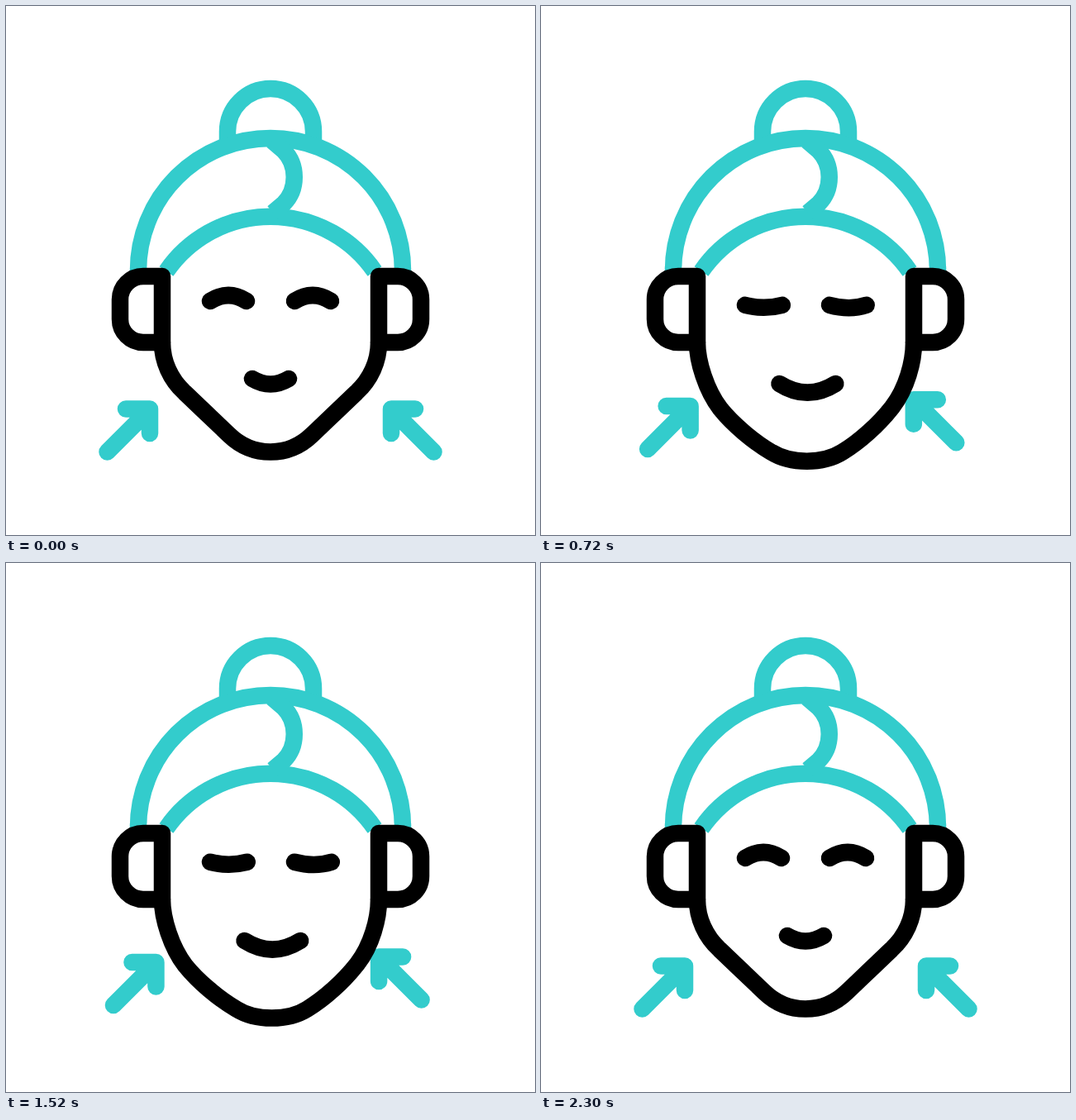
Recreate the animation shown at these times as an HTML page. Size 640 by 640 pixels, loop 2400 ms.

```html
<!DOCTYPE html>
<html lang="en">
<head>
<meta charset="utf-8">
<title>Face massage</title>
<style>
  html, body { margin: 0; width: 100%; height: 100%; overflow: hidden; background: #fff; }
  svg { display: block; width: 100vw; height: 100vh; }
  path { fill: none; stroke: #000; stroke-width: 20.5; stroke-linecap: round; stroke-linejoin: round; }
  .teal path { stroke: #3cc; }
  .hair path { stroke-linecap: butt; }
</style>
</head>
<body>
<svg viewBox="0 0 640 640">
  <g class="teal hair">
    <path d="M268 162V152A52 52 0 0 1 372 152V162"/>
    <path d="M160 322V320A160 160 0 0 1 480 320V322"/>
    <path d="M194 321A153 153 0 0 1 446 321"/>
    <path d="M322 163L336 175C353 192 353 222 336 239L323 250"/>
  </g>
  <g class="teal">
    <path id="left" d="M122.5 539.5L174 488M145 487.5H174V517"/>
    <path id="right" d="M517.5 539.5L466 488M495 487.5H466V517"/>
  </g>
  <path d="M189 407V327H166A28 28 0 0 0 138 355V379A28 28 0 0 0 166 407H189"/>
  <path d="M451 407V327H474A28 28 0 0 1 502 355V379A28 28 0 0 1 474 407H451"/>
  <path id="jaw"/>
  <path id="eyeL"/>
  <path id="eyeR"/>
  <path id="mouth"/>
</svg>
<script>
const LOOP = 2400, STEP = 20;
const $ = id => document.getElementById(id);
const mix = (a, b, p) => a + (b - a) * p;
const smooth = p => p * p * (3 - 2 * p);
const cubic = p => p < .5 ? 4 * p ** 3 : 1 - 4 * (1 - p) ** 3;

// Relaxed and smiling versions of each facial line
const shapes = {
  jaw: [
    "M189 407C189 430 199 452 216 467.5C234 484.5 252 502 270 519C283.5 532 301 539.5 320 539.5C339 539.5 356.5 532 370 519C388 502 406 484.5 424 467.5C441 452 451 430 451 407",
    "M189 407C189 430 200 468 217 492C231 511 259 534 281 545C294 552 308 553.5 322 553.5C336 553.5 350 552 363 545C384 534 409 512 425 490C443 465 451 430 451 407"],
  eyeL: ["M247 357Q269 343 291 357", "M247 363Q270 374 292 363"],
  eyeR: ["M349 357Q371 343 393 357", "M349 363Q374 375 394 363"],
  mouth: ["M298 451Q320 464 342 451", "M286 458.5Q323 482 360 458.5"]
};

function morph([from, to], p) {
  const end = to.match(/[\d.]+/g);
  let i = 0;
  return from.replace(/[\d.]+/g, n => mix(+n, +end[i++], p).toFixed(2));
}

// Eased value through a list of [time, value] keys
function track(keys, t, ease) {
  const i = keys.findIndex(k => k[0] > t);
  if (i < 0) return keys[keys.length - 1][1];
  if (!i) return keys[0][1];
  const [[t0, a], [t1, b]] = [keys[i - 1], keys[i]];
  return mix(a, b, ease((t - t0) / (t1 - t0)));
}

function moveArrow(id, t, out, inward) {
  const axis = k => track([[0, 0], [305, out[k]], [700, inward[k]], [1097, out[k]],
    [1493, inward[k]], [1888, out[k]], [2175, 0]], t, smooth);
  $(id).setAttribute("transform", `translate(${axis(0)} ${axis(1)})`);
}

function draw(now) {
  const t = Math.floor(now % LOOP / STEP) * STEP;
  const smile = track([[10, 0], [1135, 1], [2165, 0]], t, cubic);
  for (const id in shapes) $(id).setAttribute("d", morph(shapes[id], smile));
  moveArrow("right", t, [28, 31.5], [-15.5, -11.5]);
  moveArrow("left", t - 116, [-30, 33], [13, -10]);
  requestAnimationFrame(draw);
}

const start = performance.now();
(function tick() {
  draw(0);
})();
</script>
</body>
</html>
```
